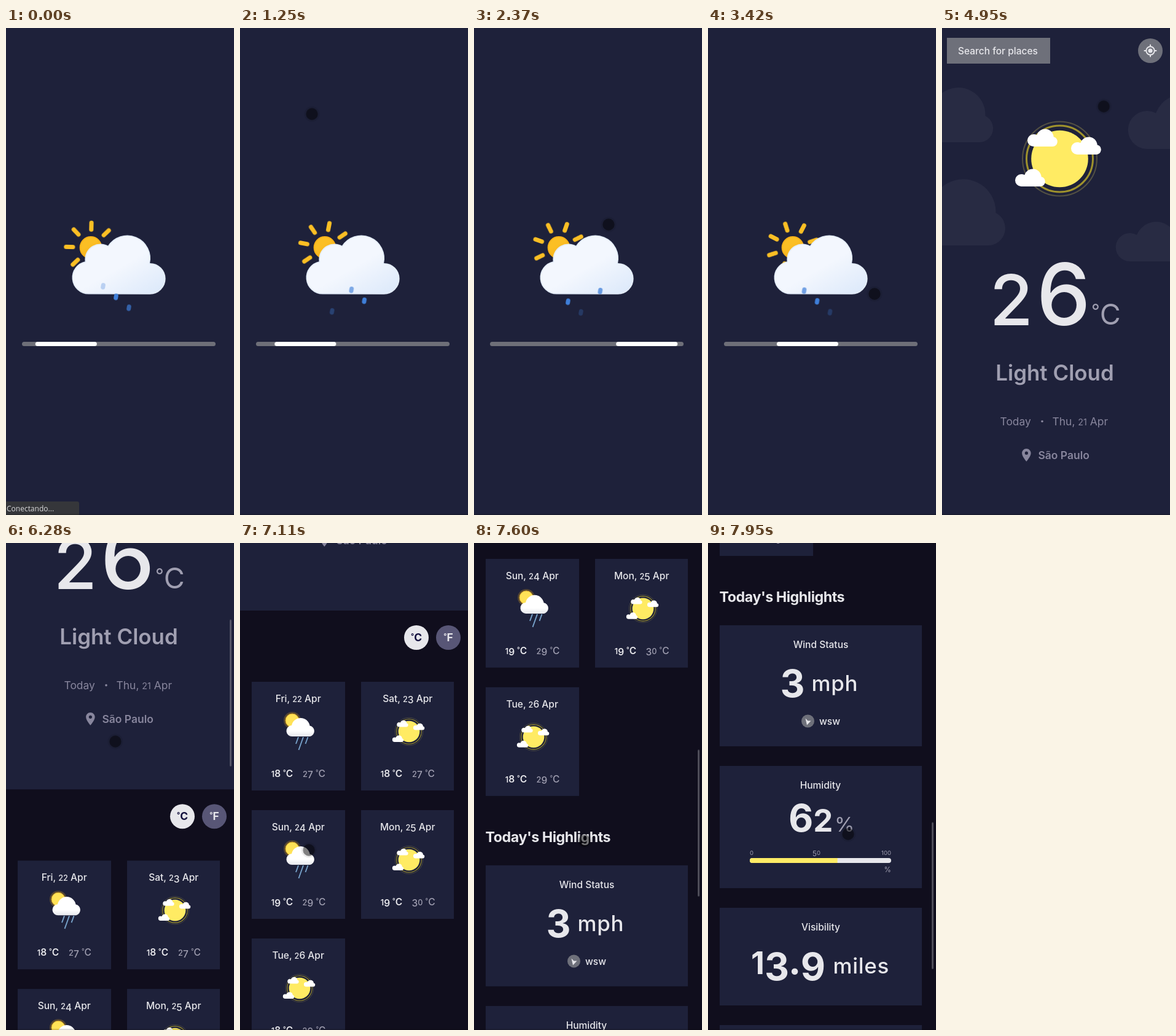
Animation, 371 px wide and 793 px high, one loop 8 s. Source, as an HTML page:

```html
<!DOCTYPE html>
<html lang="en">
<head>
<meta charset="utf-8">
<title>Weather</title>
<style>
html, body { margin: 0; width: 100%; height: 100%; overflow: hidden; background: #1e213a; }
svg.stage { display: block; width: 100%; height: 100%; }
text { font-family: Inter, Lato, sans-serif; white-space: pre; }
.tip text { font: 12px "Open Sans", "Noto Sans", sans-serif; fill: #d8d8da; }

.loader, .page, .tip, .thumb, .pointer { animation: 8s infinite; }
.loader { animation-name: leave; animation-timing-function: step-end; }
.page { animation-name: enter; animation-timing-function: step-end; }
.tip { animation-name: tip; animation-timing-function: step-end; }
@keyframes leave { 0% { opacity: 1 } 43.5%, 100% { opacity: 0 } }
@keyframes enter { 0% { opacity: 0 } 43.5%, 100% { opacity: 1 } }
@keyframes tip { 0% { opacity: 1 } 5.2%, 100% { opacity: 0 } }

.rays { animation: spin 8s linear infinite; }
@keyframes spin { from { transform: rotate(1.5deg) } to { transform: rotate(61.5deg) } }

.drop { animation: fall 1.6s linear infinite; }
@keyframes fall {
  0% { transform: translate(1px, -5px); opacity: 0 }
  33.3%, 66.7% { opacity: 1 }
  100% { transform: translate(-2px, 10px); opacity: 0 }
}

.runner { animation: run 8s cubic-bezier(.37, 0, .63, 1) -167ms infinite; }
@keyframes run {
  0%, 20.22%, 40.44%, 100% { transform: none }
  10.11%, 30.33%, 50.55% { transform: translateX(215px) }
}

.scroll { --k: -1; animation: scroll 8s cubic-bezier(.37, 0, .63, 1) infinite; }
.thumb { --k: .3025; animation: scroll 8s cubic-bezier(.37, 0, .63, 1) infinite, thumb 8s linear infinite; }
@keyframes scroll {
  0%, 73.6% { transform: translateY(0) }
  82.48%, 90.6% { transform: translateY(calc(var(--k) * 700px)) }
  99.3%, 100% { transform: translateY(calc(var(--k) * 1500px)) }
}
@keyframes thumb {
  0%, 73.5% { opacity: 0 }
  73.7%, 84% { opacity: 1 }
  87%, 90.6% { opacity: 0 }
  90.8%, 100% { opacity: 1 }
}

.pointer { animation: move 8s linear infinite, show 8s step-end infinite; }
@keyframes show { 0% { opacity: 0 } 14.4%, 100% { opacity: 1 } }
@keyframes move {
  0%, 15.63% { transform: translate(117px, 140px) }
  20.9% { transform: translate(154px, 211px) }
  31.4% { transform: translate(232px, 342px) }
  40.5%, 45.6% { transform: translate(271px, 433px) }
  48% { transform: translate(338px, 284px) }
  52% { transform: translate(268px, 552px) }
  55.75% { transform: translate(96px, 389px) }
  59% { transform: translate(235px, 335px) }
  61.88% { transform: translate(263px, 128px) }
  64.2% { transform: translate(331px, 28px) }
  66.3% { transform: translate(300px, 80px) }
  73% { transform: translate(190px, 300px) }
  78.5% { transform: translate(178px, 323px) }
  88.88% { transform: translate(112px, 500px) }
  99.37%, 100% { transform: translate(228px, 474px) }
}
</style>
</head>
<body>
<svg class="stage" viewBox="0 0 371 793" preserveAspectRatio="none">
  <defs>
    <linearGradient id="sky" gradientUnits="userSpaceOnUse" x1="22.56" y1="21.96" x2="39.2" y2="50.8">
      <stop offset=".45" stop-color="#f3f7fe"/><stop offset="1" stop-color="#deeafb"/>
    </linearGradient>
    <linearGradient id="gold" x2=".6" y2="1">
      <stop offset=".45" stop-color="#fbbf24"/><stop offset="1" stop-color="#f8af18"/>
    </linearGradient>
    <linearGradient id="grey" x2="0" y2="1">
      <stop offset=".7" stop-color="#fff"/><stop offset="1" stop-color="#e6e7ec"/>
    </linearGradient>
    <path id="puff" d="M10 30A10 10 0 0 1 10 10Q13 10 15.3 11.2A14 14 0 0 1 42.6 14.2A8 8 0 0 1 41 30z"/>
    <g id="light">
      <circle r="60.5" fill="none" stroke="#ffe95f" stroke-opacity=".24" stroke-width="2"/>
      <circle r="54" fill="none" stroke="#e5cf25" stroke-opacity=".65" stroke-width="3"/>
      <circle r="46.3" fill="#ffeb63"/>
      <g fill="#fff">
        <use href="#puff" x="-52.5" y="-50"/>
        <use href="#puff" x="18.5" y="-37"/>
        <use href="#puff" x="-72.5" y="15"/>
      </g>
    </g>
    <g id="rain">
      <circle cx="-10" cy="-18" r="14" fill="#e5a81c" fill-opacity=".28"/>
      <circle cx="-10" cy="-18" r="11" fill="#ffe257" stroke="#d9a625"/>
      <path d="M-10 8A9 9 0 0 1-11-10A15 15 0 0 1 18.5-9.6A9 9 0 0 1 19 8z" fill="url(#grey)"/>
      <path d="M0 9L-4 20M8 9L.5 30M15.500 9L11.500 20" stroke="#76a0c8" stroke-width="1.9" fill="none"/>
    </g>
  </defs>

  <g class="loader">
    <rect width="371" height="793" fill="#1e213a"/>
    <g transform="translate(71.5 273.4) scale(3.5)">
      <g transform="translate(19 24)">
        <circle r="5" fill="url(#gold)" stroke="#f8af18" stroke-width=".5"/>
        <g class="rays" id="rays" stroke="#fbbf24" stroke-width="2" stroke-linecap="round"/>
      </g>
      <path d="M46.5 31.5h-.32a10.49 10.49 0 0 0-19.11-8 7 7 0 0 0-10.57 6 7.21 7.21 0 0 0 .1 1.14A7.5 7.5 0 0 0 18 45.5h28.5a7 7 0 0 0 0-14z"
        fill="url(#sky)" stroke="#e6effc" stroke-width=".5"/>
      <g stroke="#3f7fd9" stroke-width="2" stroke-linecap="round">
        <path class="drop" style="animation-delay:-.16s" d="M24.08 45.01l-.16.98"/>
        <path class="drop" style="animation-delay:-.69s" d="M31.08 45.01l-.16.98"/>
        <path class="drop" style="animation-delay:-1.23s" d="M38.08 45.01l-.16.98"/>
      </g>
    </g>
    <rect x="26" y="511" width="315" height="7" rx="3.5" fill="#6e6f78"/>
    <rect class="runner" x="26" y="511" width="100" height="7" rx="3.5" fill="#fff"/>
    <g class="tip">
      <path d="M0 771h116a3 3 0 0 1 3 3v19H0z" fill="#35363a"/>
      <text x="1" y="787">Conectando...</text>
    </g>
  </g>

  <g class="page">
    <rect width="371" height="793" fill="#100e1d"/>
    <g class="scroll" id="doc">
      <rect width="371" height="810" fill="#1e213a"/>
      <g fill="#282b43">
        <path d="M0 186V106A44 44 0 0 1 70.5 143.3A22.5 22.5 0 0 1 61 186z"/>
        <path d="M0 354V259A53 53 0 0 1 87.5 301A28 28 0 0 1 75 354z"/>
        <path d="M371 197H334A31 31 0 1 1 348 138.5Q355 121 371 113z"/>
        <path d="M371 380H306A23 23 0 1 1 317 337A34 34 0 0 1 371 324z"/>
      </g>
      <rect x="8" y="16" width="168" height="42" fill="#6e707a"/>
      <g transform="translate(339 37)" fill="none" stroke="#e7e7eb" stroke-width="1.9">
        <circle r="20" fill="#6e707a" stroke="none"/>
        <circle r="3.6" fill="#e7e7eb" stroke="none"/>
        <circle r="6.7"/>
        <path d="M0-10.3V-6.5M0 6.5V10.3M-10.3 0H-6.5M6.5 0H10.3"/>
      </g>
      <use href="#light" transform="translate(191.5 213)"/>
      <circle cx="163" cy="640.5" r="1.8" fill="#88869d"/>
      <path transform="translate(124.9 682.8) scale(1.04)" fill="#88869d"
        d="M12 2C8.13 2 5 5.13 5 9c0 5.25 7 13 7 13s7-7.75 7-13c0-3.87-3.13-7-7-7zm0 9.5a2.5 2.5 0 1 1 0-5 2.5 2.5 0 0 1 0 5z"/>
      <circle cx="287" cy="854" r="20" fill="#e7e7eb"/>
      <circle cx="339" cy="854" r="20" fill="#585676"/>
      <g fill="#1e213a">
        <rect x="19" y="1634" width="329" height="197"/>
        <rect x="19" y="1863" width="329" height="199"/>
        <rect x="19" y="2094" width="329" height="159"/>
        <rect x="19" y="2285" width="329" height="159"/>
      </g>
      <circle cx="162.5" cy="1790" r="10.5" fill="#6e707a"/>
      <path d="M158.5 1785.5L161 1796.5L167.5 1789.5L162.5 1789.5z" fill="#e7e7eb"/>
      <rect x="68" y="2013" width="230" height="8" rx="4" fill="#e7e7eb"/>
      <path d="M210.6 2013H72a4 4 0 0 0 0 8H210.6z" fill="#ffec65"/>
    </g>
    <rect class="thumb" x="364" y="1" width="3" height="239" rx="1.5" fill="#8c8c96" fill-opacity=".5"/>
  </g>

  <rect y="791" width="371" height="2" fill="#000" fill-opacity=".15"/>
  <g class="pointer">
    <circle r="12.5" fill="#000" fill-opacity=".08"/>
    <circle r="9.7" fill="#000" fill-opacity=".46"/>
  </g>
</svg>
<script>
const NS = 'http://www.w3.org/2000/svg';
const doc = document.getElementById('doc');
const LIGHT = '#e7e7eb', SOFT = '#a09fb1', DIM = '#88869d';
const SCALE = .97; // brings cap height to .705em

function add(parent, tag, attrs, body) {
  const el = document.createElementNS(NS, tag);
  for (const k in attrs) el.setAttribute(k, attrs[k]);
  if (body) el.textContent = body;
  parent.appendChild(el);
  return el;
}

// Old-style figures: 0-2 are low, 3 4 5 7 9 hang below the baseline; the degree sign is small and raised.
function write(x, y, str, size, { w = 500, fill = LIGHT, gap = 0, at = 'start' } = {}) {
  const em = size * SCALE;
  const el = add(doc, 'text', { x, y, 'text-anchor': at });
  el.style.cssText = `font-size:${em}px;font-weight:${w};fill:${fill};letter-spacing:${gap * em}px`;
  let last = 0;
  for (const part of str.match(/[012]+|[34579]+|[68]+|°|[^\d°]+/g)) {
    const shift = /[34579]/.test(part) ? .16 * em : part === '°' ? -.25 * em : 0;
    const span = add(el, 'tspan', { dy: shift - last }, part);
    if (/[012]/.test(part)) span.style.fontSize = em * .82 + 'px';
    if (part === '°') span.style.fontSize = em * .65 + 'px';
    last = shift;
  }
}

for (let i = 0; i < 8; i++)
  add(document.getElementById('rays'), 'path', { d: 'M0-8.33V-11.5', transform: `rotate(${i * 45})` });

const mid = { at: 'middle' };

write(26, 43, 'Search for places', 16);
write(77.5, 484, '26', 144, { gap: .04 });
write(243, 483, '°C', 48, { w: 400, fill: SOFT });
write(183.5, 574, 'Light Cloud', 36, { ...mid, w: 600, fill: SOFT });
write(94.5, 647, 'Today', 18, { w: 400, fill: DIM });
write(179.5, 647, 'Thu, 21 Apr', 18, { w: 400, fill: DIM });
write(156.5, 702, 'São Paulo', 18, { w: 600, fill: DIM });
write(287, 860, '°C', 18, { ...mid, w: 700, fill: '#110e3c' });
write(339, 860, '°F', 18, { ...mid, w: 700 });

[
  ['Fri, 22 Apr', 'rain', 18, 27],
  ['Sat, 23 Apr', 'light', 18, 27],
  ['Sun, 24 Apr', 'rain', 19, 29],
  ['Mon, 25 Apr', 'light', 19, 30],
  ['Tue, 26 Apr', 'light', 18, 29]
].forEach(([day, icon, low, high], i) => {
  const x = i % 2 ? 197 : 19, y = 926 + 209 * (i >> 1);
  add(doc, 'rect', { x, y, width: i % 2 ? 151 : 152, height: 177, fill: '#1e213a' });
  write(x + 75.7, y + 33, day, 16, mid);
  const place = icon === 'rain' ? `translate(${x + 76} ${y + 81})` : `translate(${x + 78} ${y + 81}) scale(.375)`;
  add(doc, 'use', { href: '#' + icon, transform: place });
  write(x + 49.5, y + 155, low + ' °C', 16, { ...mid, w: 600 });
  write(x + 101.5, y + 155, high + ' °C', 16, { ...mid, fill: SOFT });
});

write(18.5, 1596, "Today's Highlights", 24, { w: 700, gap: -.02 });

write(183.5, 1671, 'Wind Status', 16, mid);
write(117.5, 1741, '3', 64, { w: 700 });
write(168.5, 1741, 'mph', 36, { gap: .02 });
write(181, 1796, 'wsw', 16);

write(183, 1900, 'Humidity', 16, mid);
write(131, 1970, '62', 64, { w: 700 });
write(206, 1970, '%', 34, { w: 400, fill: SOFT });
write(68, 2008, '0', 12, { w: 400, fill: SOFT });
write(176.5, 2008, '50', 12, { ...mid, w: 400, fill: SOFT });
write(298, 2008, '100', 12, { at: 'end', w: 400, fill: SOFT });
write(298, 2036, '%', 12, { at: 'end', w: 400, fill: SOFT });

write(183.5, 2131, 'Visibility', 16, mid);
write(70, 2202, '13.9', 64, { w: 700 });
write(203.5, 2201, 'miles', 36, { gap: .02 });
</script>
</body>
</html>
```
